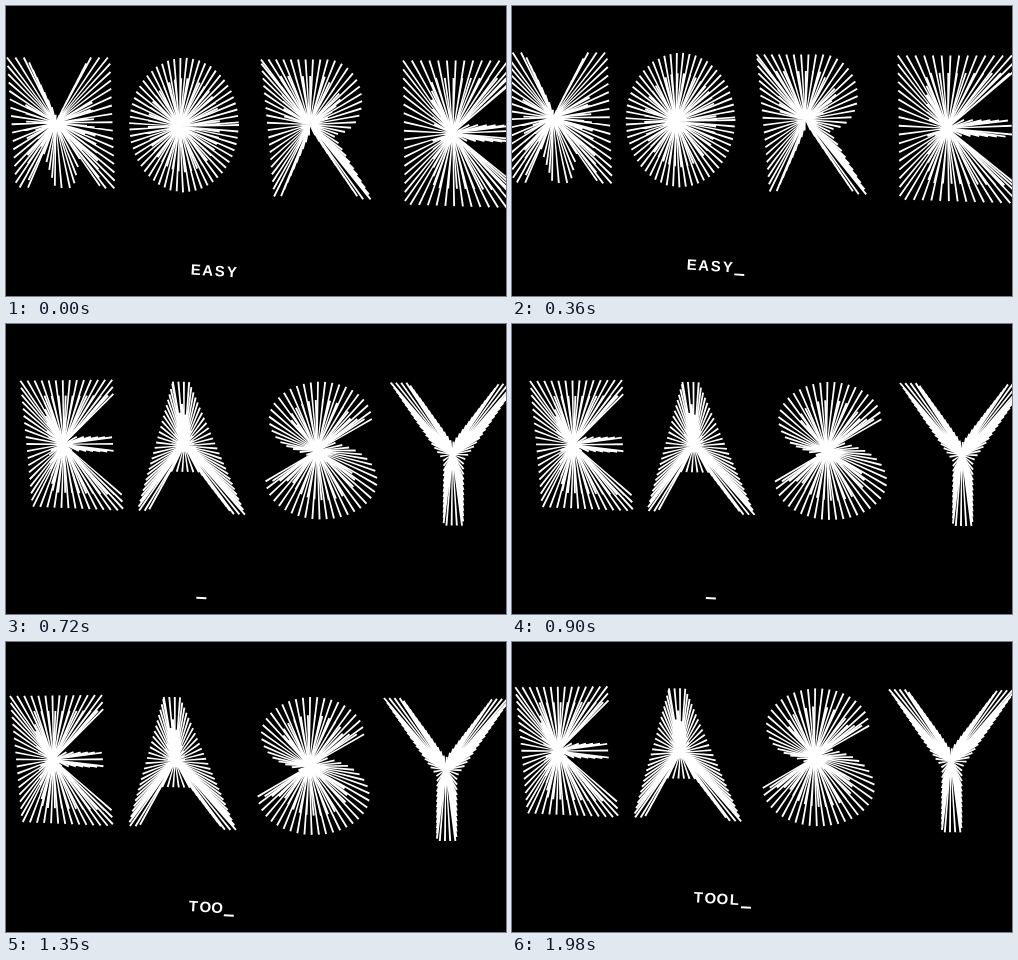
An HTML page with a canvas for the animation above (2.07 s loop, 500 by 290 pixels).

```html
<!DOCTYPE html>
<html lang="en">
<head>
<meta charset="utf-8">
<title>Ray type</title>
<style>
html, body { margin: 0; width: 100%; height: 100%; overflow: hidden; background: #000; }
canvas { display: block; }
</style>
</head>
<body>
<canvas id="stage" width="500" height="290"></canvas>
<script>
const ctx = document.getElementById('stage').getContext('2d');
const LOOP = 2070, STEP = 90, SWITCH = 450, RAYS = 100, PI = Math.PI;

const points = str => str.split(' ').map(s => s.split(',').map(Number));

function arc(cx, cy, rx, ry, from, to) {
  return Array.from({ length: 25 }, (_, k) => {
    const a = from + (to - from) * k / 24;
    return [cx + rx * Math.cos(a), cy + ry * Math.sin(a)];
  });
}

// Glyphs in a unit square: hub of the rays, then closed outlines
const GLYPHS = {
  M: [[0.44, 0.5], points('0,0 .19,0 .46,.47 .8,0 1,0 1,1 .85,1 .81,.34 .58,1 .4,1 .15,.34 .13,1 0,1')],
  O: [[0.46, 0.51], arc(0.5, 0.5, 0.5, 0.5, 0, 2 * PI), arc(0.5, 0.5, 0.33, 0.35, 0, 2 * PI)],
  R: [[0.43, 0.47],
    [[0, 0], ...arc(0.66, 0.27, 0.32, 0.27, -PI / 2, PI / 2), ...points('1,1 .87,1 .47,.54 .42,.54 .07,1 0,1')],
    points('.18,.12 .62,.12 .78,.27 .62,.42 .18,.42')],
  E: [[0.41, 0.5], points('0,0 1,0 1,.12 .24,.12 .24,.44 .95,.44 .95,.55 .24,.55 .24,.88 1,.88 1,1 0,1')],
  A: [[0.48, 0.49],
    points('.42,0 .57,0 1,1 .88,1 .61,.69 .33,.69 .1,1 0,1'),
    points('.49,.17 .585,.48 .36,.48')],
  S: [[0.46, 0.5], [
    ...arc(0.49, 0.27, 0.46, 0.27, 0, -3.9), [0.5, 0.58],
    ...arc(0.52, 0.72, 0.28, 0.14, -1, PI),
    ...arc(0.5, 0.72, 0.5, 0.28, PI, -1.1), [0.33, 0.36],
    ...arc(0.49, 0.27, 0.27, 0.14, -PI, 0)]],
  Y: [[0.49, 0.5], points('0,0 .14,0 .49,.42 .86,0 1,0 .58,.55 .575,1 .42,1 .42,.55')]
};

const mix = (a, b, f) => a.map((v, i) => v + (b[i] - v) * f);
const dist = (a, b) => Math.hypot(b[0] - a[0], b[1] - a[1]);
const edges = loop => loop.map((p, i) => [p, loop[(i + 1) % loop.length]]);

// Evenly spaced points around a closed outline
function walk(loop, gap) {
  const out = [];
  let d = 0;
  for (const [a, b] of edges(loop)) {
    const len = dist(a, b);
    for (; d < len; d += gap) out.push(mix(a, b, d / len));
    d -= len;
  }
  return out;
}

// Fits a glyph into a corner box; late is the direction that grows last
function letter(name, corners, late = 0) {
  const [tl, tr, br, bl] = points(corners);
  const place = ([u, v]) => mix(mix(tl, tr, u), mix(bl, br, u), v);
  const [hub, ...loops] = GLYPHS[name];
  const placed = loops.map(loop => loop.map(place));
  const total = placed.flatMap(edges).reduce((sum, [a, b]) => sum + dist(a, b), 0);
  return { hub: place(hub), ends: placed.flatMap(loop => walk(loop, total / RAYS)), late };
}

const MORE = {
  caption: [180, 265],
  letters: [
    letter('M', '-2,48 101,48 106,179 7,178'),
    letter('O', '119,48 229,48 229,183 119,183'),
    letter('R', '250,50 350,50 361,190 263,187'),
    letter('E', '391,51 508,51 514,199 393,195')]
};
const EASY = {
  caption: [194, 272],
  letters: [
    letter('E', '18,57 110,56 121,187 30,183'),
    letter('A', '125,58 233,58 243,191 135,187', 2.1),
    letter('S', '263,58 375,58 375,196 263,196'),
    letter('Y', '388,59 514,60 514,202 388,202')]
};

// Camera drift: time, x, y, spread
const CAMERA = [
  [0, 4.5, 3.5, 3], [270, -1, -2, 0], [SWITCH, -10, -1, 1], [900, 0, 0, 0],
  [1350, -12, -3, 4], [1710, -12, -10, 2], [LOOP, -13, -12, 4]
];

function camera(t) {
  const i = CAMERA.findLastIndex(k => k[0] <= t);
  const a = CAMERA[i], b = CAMERA[i + 1];
  const f = (t - a[0]) / (b[0] - a[0]);
  return mix(a, b, f * f * (3 - 2 * f)).slice(1);
}

// Each ray widens from the hub to its tip
function drawLetter({ hub: [x, y], ends, late }, grow) {
  ctx.beginPath();
  for (const [ex, ey] of ends) {
    const a = Math.atan2(ey - y, ex - x);
    const s = 1 - (1 - grow) * (1 + Math.cos(a - late));
    const tx = x + (ex - x) * s, ty = y + (ey - y) * s;
    const nx = -Math.sin(a), ny = Math.cos(a);
    ctx.moveTo(x - nx * 0.45, y - ny * 0.45);
    ctx.lineTo(tx - nx * 0.95, ty - ny * 0.95);
    ctx.lineTo(tx + nx * 0.95, ty + ny * 0.95);
    ctx.lineTo(x + nx * 0.45, y + ny * 0.45);
    ctx.closePath();
  }
  ctx.fill();
}

function drawCaption(text, [x, y], cursor) {
  ctx.save();
  ctx.translate(x, y);
  ctx.rotate(0.06);
  [...text].forEach((c, i) => ctx.fillText(c, i * 12 + 5, 0));
  if (cursor) ctx.fillRect(text.length * 12, 1, 10, 2);
  ctx.restore();
}

function draw(now) {
  const t = Math.floor(now % LOOP / STEP) * STEP;
  const first = t < SWITCH, word = first ? MORE : EASY;
  const [dx, dy, spread] = camera(t);
  const grow = first ? 1 : 1 - 0.4 * Math.exp((SWITCH - t) / 47);
  const typed = first ? 'EASY' : 'TOOL'.slice(0, Math.max(0, Math.floor((t - 900) / 150)));

  ctx.fillStyle = '#000';
  ctx.fillRect(0, 0, 500, 290);
  ctx.fillStyle = '#fff';
  ctx.font = 'bold 15px "Liberation Sans", Arial, sans-serif';
  ctx.textAlign = 'center';
  word.letters.forEach((l, i) => {
    ctx.save();
    ctx.translate(dx + spread * (i / 3 - 0.5), dy);
    drawLetter(l, grow);
    ctx.restore();
  });
  ctx.save();
  ctx.translate(dx, dy);
  drawCaption(typed, word.caption, t >= STEP);
  ctx.restore();
}

const start = performance.now();
function tick() {
  draw(performance.now() - start);
  requestAnimationFrame(tick);
}
tick();
</script>
</body>
</html>
```
